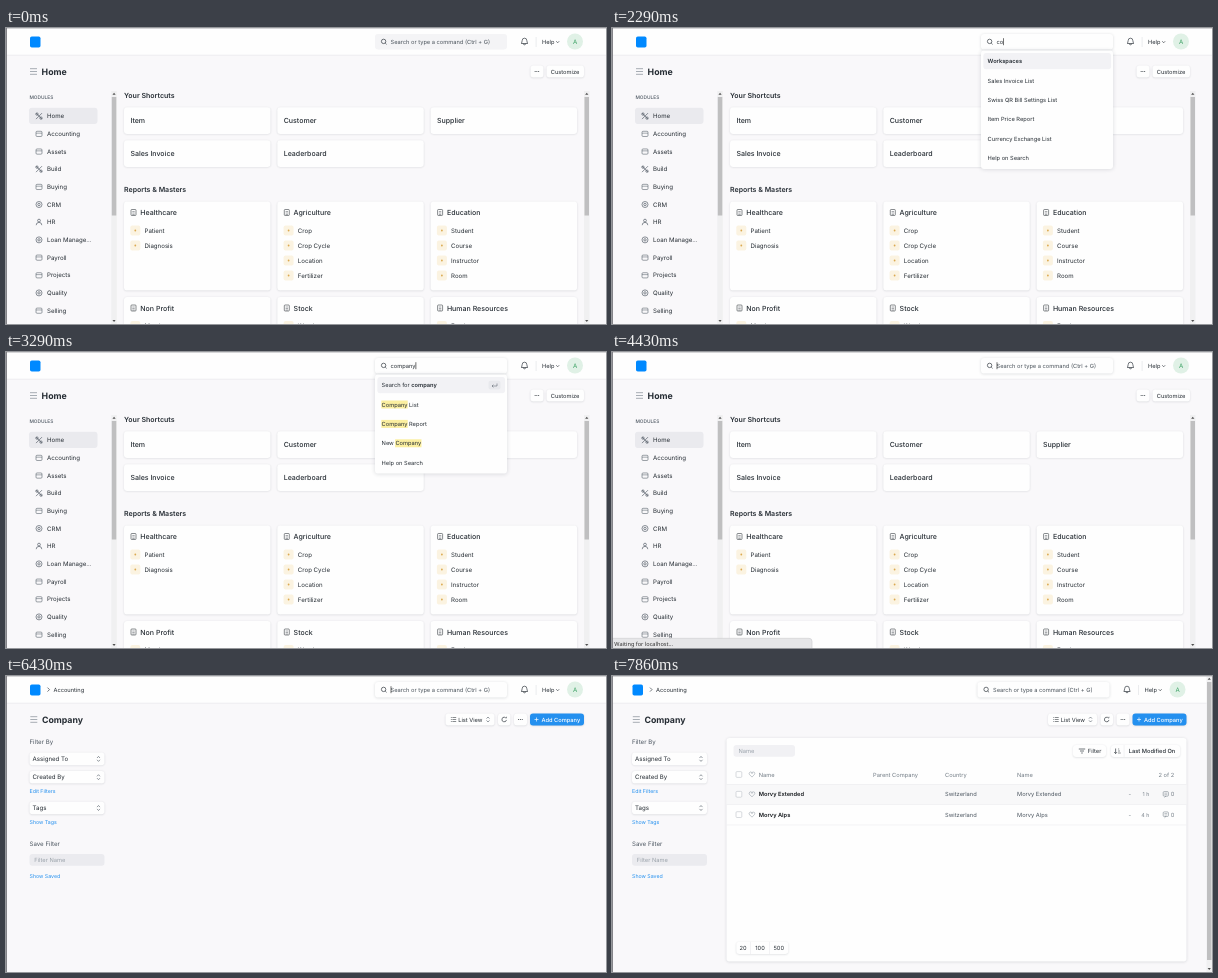
An HTML page with a canvas for the animation above (8 s loop, 600 px wide and 296 px high).

```html
<!DOCTYPE html>
<html lang="en">
<head>
<meta charset="utf-8">
<title>Search and open a list</title>
<style>
html, body { margin: 0; width: 100%; height: 100%; overflow: hidden; background: #f9f8fa; }
canvas { display: block; width: 600px; height: 296px; }
</style>
</head>
<body>
<canvas id="stage"></canvas>
<script>
const LOOP = 8000;
const UNIT = 600 / 1366; // CSS pixel of the drawn screen
const SHIFT = 3.5;       // room taken by the page scrollbar
const INK = '#252c33', DIM = '#4c5660', MUTED = '#737d86', PALE = '#9aa2aa';
const BLUE = '#2490ef', WHITE = '#fefefe', BG = '#f9f8fa', EDGE = '#e6e7eb';

const canvas = document.getElementById('stage');
const ratio = window.devicePixelRatio || 1;
canvas.width = 600 * ratio;
canvas.height = 296 * ratio;
const c = canvas.getContext('2d');

function setFont(size, weight) {
  c.font = `${weight} ${size * UNIT}px Inter, sans-serif`;
}

// Text is placed by the middle of its capitals.
function text(str, x, mid, size = 13, weight = 400, color = INK, align = 'left') {
  setFont(size, weight);
  c.textAlign = align;
  c.fillStyle = color;
  c.fillText(str, x, mid + size * UNIT * 0.364);
  return c.measureText(str).width;
}

function rect(x, y, w, h, color) {
  c.fillStyle = color;
  c.fillRect(x, y, w, h);
}

function box(x, y, w, h, r, fill, border) {
  c.beginPath();
  c.roundRect(x, y, w, h, r);
  if (fill) { c.fillStyle = fill; c.fill(); }
  if (border) { c.strokeStyle = border; c.lineWidth = 0.55; c.stroke(); }
}

function raised(x, y, w, h, blur = 2, fill = WHITE) {
  c.save();
  c.shadowColor = 'rgba(25,39,52,.16)';
  c.shadowBlur = blur * ratio;
  c.shadowOffsetY = 0.4 * ratio;
  box(x, y, w, h, 3, fill);
  c.restore();
}

function stroke(color, width) {
  c.strokeStyle = color;
  c.lineWidth = width;
  c.stroke();
}

function line(x1, y1, x2, y2, color = INK, width = 0.65) {
  c.beginPath();
  c.moveTo(x1, y1);
  c.lineTo(x2, y2);
  stroke(color, width);
}

function hline(x, y, half, color, width) {
  line(x - half, y, x + half, y, color, width);
}

function ring(x, y, r, color = INK, from = 0, to = Math.PI * 2, width = 0.65) {
  c.beginPath();
  c.arc(x, y, r, from, to);
  stroke(color, width);
}

function disc(x, y, r, color) {
  c.beginPath();
  c.arc(x, y, r, 0, Math.PI * 2);
  c.fillStyle = color;
  c.fill();
}

// Chevron opening up (dir 1) or down (dir -1).
function chevron(x, y, dir, color = INK) {
  c.beginPath();
  c.moveTo(x - 1.5, y - dir * 0.8);
  c.lineTo(x, y + dir * 0.8);
  c.lineTo(x + 1.5, y - dir * 0.8);
  stroke(color, 0.6);
}

function upDown(x, y) {
  chevron(x, y - 1.7, -1, DIM);
  chevron(x, y + 1.7, 1, DIM);
}

function triangle(x, y, dir) {
  c.beginPath();
  c.moveTo(x - 1.6, y + dir);
  c.lineTo(x + 1.6, y + dir);
  c.lineTo(x, y - dir);
  c.fillStyle = '#505050';
  c.fill();
}

function scrollbar(x, top, thumbTop, thumbBottom) {
  rect(x, top, 5.5, 296 - top, '#f0f0f1');
  rect(x + 0.5, thumbTop, 4.5, thumbBottom - thumbTop, '#bfbfc0');
  triangle(x + 2.75, top + 2.8, 1);
  triangle(x + 2.75, 293, -1);
}

function moreButton(x) {
  raised(x, 37.5, 13, 12);
  for (const d of [-1.8, 0, 1.8]) disc(x + 6.4 + d, 43.5, 0.5, INK);
}

function hamburger(x) {
  for (const d of [-2.8, 0, 2.8]) hline(x + 3.5, 43.5 + d, 3.5, '#7b858f');
}

function pageTitle(label, x) {
  hamburger(x);
  text(label, x + 11.6, 43.6, 20, 700);
}

function bell(x, y) {
  ring(x, y - 1, 2.3, INK, Math.PI, 0);
  line(x - 2.3, y - 1, x - 3, y + 2);
  line(x + 2.3, y - 1, x + 3, y + 2);
  hline(x, y + 2, 3.2);
  ring(x, y + 2.2, 1.1, INK, 0, Math.PI);
}

function navbar(s) {
  rect(0, 0, 600, 27, WHITE);
  rect(0, 26.8, 600, 0.6, '#e3e4e8');
  c.save();
  if (s.page === 'list') c.translate(-SHIFT, 0);
  box(24, 8.5, 10.5, 11, 1.8, '#0089ff');
  if (s.page === 'list' || s.page === 'header') {
    line(41.5, 11.6, 43.5, 13.6);
    line(43.5, 13.6, 41.5, 15.6);
    text('Accounting', 47.5, 13.6);
  }
  if (s.focus) raised(369, 6, 132, 15.5, 3);
  else box(369, 6, 132, 15.5, 3, '#f4f4f6');
  ring(377.6, 13.4, 2.2);
  line(379.2, 15, 380.6, 16.4);
  if (s.query) text(s.query, 384.5, 13.7);
  else if (!s.open) text('Search or type a command (Ctrl + G)', 384.5, 13.7, 13, 400, '#4a535b');
  if (s.caret) {
    setFont(13, 400);
    rect(384.7 + c.measureText(s.query).width, 10.2, 0.6, 7, '#111');
  }
  bell(518.5, 13.5);
  rect(529.8, 9, 0.5, 10, '#d8dbdf');
  text('Help', 536, 13.6);
  chevron(551.7, 14, 1);
  disc(569, 13.5, 8, '#e0f1e6');
  text('A', 569, 13.7, 14, 400, '#3aa163', 'center');
  c.restore();
}

const ICONS = {
  tools(x, y) {
    line(x - 3, y - 3, x + 3, y + 3, DIM);
    line(x + 3, y - 3, x - 3, y + 3, DIM);
    ring(x - 2, y - 2, 1.2, DIM);
    ring(x + 2, y + 2, 1.2, DIM);
  },
  frame(x, y) {
    box(x - 3, y - 2.5, 6, 5.2, 1, null, DIM);
    hline(x, y - 0.6, 3, DIM, 0.5);
  },
  bars(x, y) {
    for (let i = 0; i < 4; i++) line(x - 3 + i * 2, y + 3, x - 3 + i * 2, y - (i * 5) % 4, DIM);
  },
  person(x, y) {
    ring(x, y - 1.6, 1.4, DIM);
    ring(x, y + 3, 2.8, DIM, Math.PI, 0);
  },
  round(x, y) {
    ring(x, y, 3, DIM);
    ring(x, y, 1.2, DIM);
  }
};

const MODULES = [
  ['Home', 'tools'], ['Accounting', 'frame'], ['Assets', 'frame'], ['Build', 'tools'],
  ['Buying', 'frame'], ['CRM', 'round'], ['HR', 'person'], ['Loan Manage...', 'round'],
  ['Payroll', 'frame'], ['Projects', 'frame'], ['Quality', 'round'], ['Selling', 'frame']
];

const CARDS = [
  ['Healthcare', 'Patient', 'Diagnosis'],
  ['Agriculture', 'Crop', 'Crop Cycle', 'Location', 'Fertilizer'],
  ['Education', 'Student', 'Course', 'Instructor', 'Room'],
  ['Non Profit', 'Member'],
  ['Stock', 'Warehouse'],
  ['Human Resources', 'Employee']
];

const columnX = i => 118 + (i % 3) * 153.3;

function card([title, ...items], i) {
  const x = columnX(i), y = i < 3 ? 173.5 : 269;
  raised(x, y, 146.5, 89);
  box(x + 7, y + 8, 5, 6, 0.8, null, INK);
  for (const d of [10, 11.5, 13]) hline(x + 9.5, y + d, 1.2, INK, 0.4);
  text(title, x + 16.3, y + 11.2, 16, 500);
  items.forEach((item, n) => {
    const mid = y + 29 + n * 15;
    box(x + 6.3, mid - 5, 10, 10, 2, '#fbf3e1');
    disc(x + 11.3, mid, 0.9, '#dba94f');
    text(item, x + 20.5, mid, 14);
  });
}

function home() {
  pageTitle('Home', 24);
  moreButton(524.5);
  raised(540.5, 37.5, 37.5, 12);
  text('Customize', 559, 43.6, 13, 400, INK, 'center');

  text('MODULES', 23.4, 69.2, 11, 500, DIM);
  box(23, 79.8, 68.5, 16.2, 3, '#eaeaee');
  MODULES.forEach(([name, icon], i) => {
    const mid = 88.1 + i * 17.68;
    ICONS[icon](33, mid);
    text(name, 41, mid, 14);
  });
  scrollbar(105.3, 63, 69, 187.5);

  text('Your Shortcuts', 118, 67.7, 16, 600);
  ['Item', 'Customer', 'Supplier', 'Sales Invoice', 'Leaderboard'].forEach((name, i) => {
    const x = columnX(i), y = i < 3 ? 79.3 : 112.3;
    raised(x, y, 146.5, 26.6);
    text(name, x + 6.4, y + 13.4, 16, 500);
  });
  text('Reports & Masters', 118, 161.8, 16, 600);
  CARDS.forEach(card);
  scrollbar(578, 63, 69, 187.5);
}

const RECENT = ['Workspaces', 'Sales Invoice List', 'Swiss QR Bill Settings List',
  'Item Price Report', 'Currency Exchange List', 'Help on Search'];

// Draws runs of text; the marked one gets a yellow ground.
function runs(parts, x, mid) {
  for (const [str, kind] of parts) {
    const weight = kind === 'bold' ? 600 : 400;
    if (kind === 'mark') {
      setFont(13, weight);
      rect(x - 0.3, mid - 4, c.measureText(str).width + 0.6, 8, '#fbefa0');
    }
    x += text(str, x, mid, 13, weight);
  }
}

function dropdown(term) {
  const hit = 'C' + term.slice(1), rest = 'company'.slice(term.length);
  const rows = term ? [
    [['Search for '], [term, 'bold']],
    [[hit, 'mark'], [rest + ' List']],
    [[hit, 'mark'], [rest + ' Report']],
    [['New '], [hit, 'mark'], [rest]],
    [['Help on Search']]
  ] : RECENT.map((name, i) => [[name, i ? '' : 'bold']]);
  raised(369, 22.5, 132, 2 + rows.length * 19.4, 4);
  box(371.3, 25, 127.8, 16.3, 3, '#f2f2f5');
  rows.forEach((parts, i) => runs(parts, 375.6, 33.1 + i * 19.4));
  if (term) {
    box(482.5, 28.8, 12, 8.8, 2, '#e8e9ed');
    hline(488.5, 34, 2.5, DIM, 0.5);
    line(491, 34, 491, 31.5, DIM, 0.5);
    line(486, 34, 487.4, 32.6, DIM, 0.5);
    line(486, 34, 487.4, 35.4, DIM, 0.5);
  }
}

function status() {
  box(0, 286.3, 200, 12, [0, 3, 0, 0], '#e6e6e8', '#c9c9cc');
  c.font = '5.6px "Noto Sans", sans-serif';
  c.textAlign = 'left';
  c.fillStyle = '#333';
  c.fillText('Waiting for localhost...', 2.3, 293.5);
}

function selectBox(label, mid) {
  raised(20, mid - 6.3, 75, 12.6);
  text(label, 23, mid, 14);
  upDown(89, mid);
}

function listHeader() {
  pageTitle('Company', 20.8);
  raised(436, 37.5, 49, 12);
  for (const d of [-2, 0, 2]) {
    hline(441.8, 43.5 + d, 0.4);
    hline(444.8, 43.5 + d, 1.9, INK, 0.55);
  }
  text('List View', 448.7, 43.6);
  upDown(478.5, 43.5);
  raised(488.5, 37.5, 12.5, 12);
  ring(494.7, 43.5, 2.3, INK, 0.2, 5.4);
  line(497, 40.8, 496.6, 42.4);
  moreButton(504.5);
  raised(520.5, 37.5, 54, 12, 2, BLUE);
  hline(527, 43.5, 2, '#fff');
  line(527, 41.5, 527, 45.5, '#fff');
  text('Add Company', 532, 43.6, 13, 500, '#fff');

  text('Filter By', 20, 66, 14, 400, DIM);
  selectBox('Assigned To', 82.9);
  selectBox('Created By', 101.2);
  text('Edit Filters', 20, 115.3, 12, 400, BLUE);
  selectBox('Tags', 132);
  text('Show Tags', 20, 146.2, 12, 400, BLUE);
  text('Save Filter', 20, 167.3, 14, 400, DIM);
  box(20, 178, 75, 11.8, 3, '#ebebef');
  text('Filter Name', 24.8, 184, 13, 400, PALE);
  text('Show Saved', 20, 200.3, 12, 400, BLUE);
}

function heart(x, y) {
  c.beginPath();
  c.moveTo(x, y + 2.5);
  c.lineTo(x - 2.5, y);
  c.arc(x - 1.3, y - 1.1, 1.5, Math.PI * 0.75, 0);
  c.arc(x + 1.3, y - 1.1, 1.5, Math.PI, Math.PI * 0.25);
  c.closePath();
  stroke('#89939c', 0.5);
}

function rowStart(mid) {
  box(124, mid - 3, 5.8, 5.8, 1, WHITE, '#b8bec5');
  heart(140, mid);
}

function listRow(name, age, mid) {
  rowStart(mid);
  text(name, 146.7, mid, 13, 600, '#15191d');
  text('Switzerland', 333, mid, 13, 400, DIM);
  text(name, 405, mid, 13, 400, DIM);
  text('-', 516.5, mid, 13, 400, MUTED);
  text(age, 537.3, mid, 12, 400, MUTED, 'right');
  box(551.2, mid - 2.8, 5.2, 4.6, 1, null, MUTED);
  line(552.6, mid + 3, 553.8, mid + 1.8, MUTED);
  for (const d of [-1.2, 0.3]) hline(553.8, mid + d, 1.4, MUTED, 0.45);
  text('0', 558.8, mid, 13, 400, MUTED);
}

function listBody(s) {
  raised(114.5, 62, 460, 223.5, 3);
  box(121.5, 69, 61.5, 11.7, 3, '#f1f1f4');
  text('Name', 126.4, 75, 13, 400, PALE);
  raised(461, 69, 33, 12);
  for (let i = 0; i < 3; i++) hline(470, 73 + i * 2, 3.2 - i * 1.2);
  text('Filter', 475.8, 75);
  raised(499, 69, 69, 12);
  rect(511.8, 69, 0.5, 12, EDGE);
  line(503.6, 72.5, 503.6, 77.5);
  chevron(503.6, 76.8, 1);
  for (let i = 0; i < 3; i++) hline(506.6 + i * 0.4, 73 + i * 2, 0.6 + i * 0.4, INK, 0.5);
  text('Last Modified On', 516.8, 75, 13, 500);

  rowStart(98.6);
  [['Name', 146.7], ['Parent Company', 261], ['Country', 333], ['Name', 405]]
    .forEach(([label, x]) => text(label, x, 98.7, 13, 400, MUTED));
  text(s.loading ? 'Refreshing...' : '2 of 2', 562.2, 98.7, 13, 400, MUTED, 'right');
  if (s.hover) rect(114.7, 108.5, 459.6, 19.8, '#f8f8f9');
  for (let i = 0; i < 3; i++) rect(114.7, 108.3 + i * 20.2, 459.6, 0.5, EDGE);
  listRow('Morvy Extended', '1 h', 118.4);
  listRow('Morvy Alps', '4 h', 138.7);

  raised(124.3, 265.8, 52, 12.3);
  for (const x of [138, 157.2]) rect(x, 265.8, 0.5, 12.3, EDGE);
  [['20', 131], ['100', 148], ['500', 166.7]].forEach(([n, x]) => text(n, x, 272, 13, 400, INK, 'center'));
}

function stateAt(t) {
  const between = (a, b) => t >= a && t < b;
  const open = between(1430, 4430);
  const keys = [2140, 2290, 2430, 2570, 2710, 3000, 3140];
  const results = [[2570, 'com'], [2710, 'comp'], [2860, 'compa'], [3140, 'compan'], [3290, 'company']];
  return {
    page: t < 5710 ? 'home' : t < 6430 ? 'blank' : t < 6860 ? 'header' : 'list',
    focus: t >= 1290,
    open,
    query: open ? 'company'.slice(0, keys.filter(k => t >= k).length) : '',
    term: results.reduce((term, [at, word]) => t >= at ? word : term, ''),
    caret: between(1290, 2000) || between(2140, 3860) || between(4000, 4710) ||
      between(5710, 5860) || between(6430, 7430),
    status: between(4430, 4860),
    loading: t < 7710,
    hover: t >= 7140
  };
}

function draw(t) {
  const s = stateAt(t);
  c.setTransform(ratio, 0, 0, ratio, 0, 0);
  c.textRendering = 'geometricPrecision';
  rect(0, 0, 600, 296, BG);
  navbar(s);
  if (s.page === 'home') home();
  if (s.page === 'blank') hamburger(24);
  if (s.page === 'header') {
    c.save();
    c.translate(SHIFT, 0);
    listHeader();
    c.restore();
  }
  if (s.page === 'list') {
    listHeader();
    listBody(s);
    scrollbar(594.5, 0, 6, 284);
  }
  if (s.open) dropdown(s.term);
  if (s.status) status();
  rect(0, 0, 600, 0.7, '#c4c4c8');
  rect(0, 0, 0.9, 296, '#77777c');
}

function tick() {
  draw(performance.now() % LOOP);
  requestAnimationFrame(tick);
}
tick();
</script>
</body>
</html>
```
